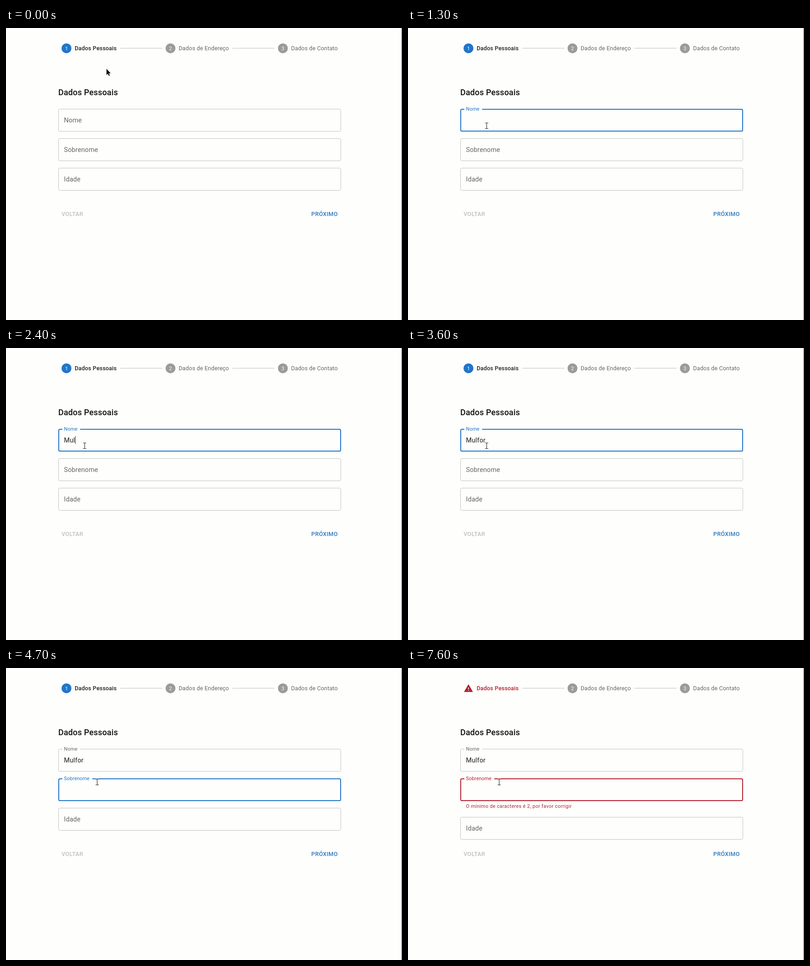
Recreate the animation shown at these times as an HTML page. Size 871 by 643 pixels, loop 8000 ms.

```html
<!DOCTYPE html>
<html lang="pt-BR">
<head>
<meta charset="utf-8">
<title>Cadastro em etapas</title>
<style>
  :root {
    --paper: #fefefd;
    --ink: #212121;
    --soft: #666;
    --line: #c1c1c1;
    --blue: #2074c4;
    --red: #b3202f;
  }
  html, body { margin: 0; width: 100%; height: 100%; overflow: hidden; background: var(--paper); }
  svg { display: block; width: 871px; height: 643px; font-family: Roboto, sans-serif; }
  text { white-space: pre; }
  .step { font-size: 12.6px; letter-spacing: .01071em; fill: var(--soft); }
  .num { font-size: 10.8px; fill: #fff; text-anchor: middle; }
  .dot { fill: #9b9b9b; }
  .rail { stroke: #bdbdbd; }
  .bold { font-weight: 500; }
  .head { font-size: 18px; letter-spacing: .0075em; fill: #111; }
  .btn { font-size: 12.6px; letter-spacing: .02857em; }
  .label, .value { font-size: 14.4px; letter-spacing: .00938em; }
  .value { fill: var(--ink); }
  .help { font-size: 10.8px; letter-spacing: .03333em; fill: var(--red); }
  .box { fill: none; }
</style>
</head>
<body>
<svg viewBox="0 0 871 643">
  <rect width="871" height="643" fill="#fefefd"/>
  <path d="M870.5 0V643" stroke="#55555a"/>

  <g id="badge">
    <circle cx="133" cy="44.7" r="10.8" fill="#2076cb"/>
    <text class="num" x="133" y="48.6">1</text>
  </g>
  <path id="alert" transform="translate(122.2 33.9) scale(.9)" fill="#b3202f"
        d="M1 21h22L12 2zm12-3h-2v-2h2zm0-4h-2v-4h2z"/>
  <text id="active" class="step bold" x="151" y="49">Dados Pessoais</text>
  <path class="rail" d="M251 44.5H344M498 44.5H591"/>
  <circle class="dot" cx="361.8" cy="44.7" r="10.8"/>
  <text class="num" x="361.8" y="48.6">2</text>
  <text class="step" x="379.7" y="49">Dados de Endereço</text>
  <circle class="dot" cx="609" cy="44.7" r="10.8"/>
  <text class="num" x="609" y="48.6">3</text>
  <text class="step" x="627" y="49">Dados de Contato</text>

  <text class="head bold" x="115" y="148">Dados Pessoais</text>
  <g id="form"></g>
  <text class="btn bold" x="122.2" y="414" fill="#bfbfbf">VOLTAR</text>
  <text class="btn bold" x="671.5" y="414" fill="#2a76bd">PRÓXIMO</text>

  <rect id="caret" width="1" height="17" fill="#222"/>
  <g id="arrow">
    <path d="M0 0V13.6L3.1 10.7 5.2 15.6 7.4 14.6 5.3 9.8H9.4Z" fill="#111" stroke="#fff" stroke-width="1.6"
          paint-order="stroke" stroke-linejoin="round"/>
  </g>
  <g id="beam" fill="none">
    <path d="M-3.5-6H-1L0-5.5 1-6H3.5M0-5.5V6M-3.5 6.5H-1L0 6 1 6.5H3.5" stroke="#fff" stroke-width="2.6"/>
    <path d="M-3.5-6H-1L0-5.5 1-6H3.5M0-5.5V6M-3.5 6.5H-1L0 6 1 6.5H3.5" stroke="#222" stroke-width="1.1"/>
  </g>
</svg>
<script>
const LOOP = 8000, TICK = 100;
const LEFT = 115, RIGHT = 737, HEIGHT = 50, TEXT_X = 127.6;
const NAME = 'Mulfor';
const $ = id => document.getElementById(id);

// Value of the last [time, value] pair already reached.
const at = (list, t) => list.reduce((v, [time, next]) => t >= time ? next : v, list[0][1]);
const ramp = (t, start, span = 200) => {
  const x = Math.min(1, Math.max(0, (t - start) / span));
  return 1 - (1 - x) ** 3;
};
const mix = (from, to, p) => `color-mix(in srgb, ${to} ${(p * 100).toFixed(1)}%, ${from})`;
const show = (node, on) => node.setAttribute('visibility', on ? 'visible' : 'hidden');

const typed = [[0, 0], [1800, 1], [1900, 2], [2400, 3], [2700, 4], [2900, 5], [3000, 6]];
const surname = [[0, ''], [5000, '4'], [6300, ''], [6800, '4'], [7500, '']];
const caretOn = [[0, 0], [900, 1], [1300, 0], [1800, 1], [3600, 0], [4100, 1], [4700, 0],
  [5000, 1], [5500, 0], [6200, 1], [6800, 0], [7500, 1], [7600, 0]];
const FOCUS = [780, 4020];
const rests = [[600, [173, 215]], [3800, [176, 222]], [4000, [200.5, 251]]];

function add(cls, content = '', tag = 'text') {
  const node = document.createElementNS('http://www.w3.org/2000/svg', tag);
  node.setAttribute('class', cls);
  node.textContent = content;
  $('form').append(node);
  return node;
}

const fields = ['Nome', 'Sobrenome', 'Idade'].map(name => ({
  box: add('box', '', 'path'),
  label: add('label', name),
  value: add('value'),
  help: add('help', 'O mínimo de caracteres é 2, por favor corrigir')
}));

function place(node, x, y) {
  node.setAttribute('x', x);
  node.setAttribute('y', y);
}

// Rounded outline with an opening for the raised label.
function outline(top, width, gap) {
  const i = width / 2, r = 3.6 - i;
  const l = LEFT + i, b = top + HEIGHT - i, y = top + i, e = RIGHT - i;
  const arc = (dx, dy) => `a${r} ${r} 0 0 1 ${dx} ${dy}`;
  return `M${124 + gap} ${y}H${e - r}${arc(r, r)}V${b - r}${arc(-r, r)}` +
    `H${l + r}${arc(-r, -r)}V${y + r}${arc(r, -r)}H124`;
}

function pointer(t) {
  if (t >= 600) return at(rests, t);
  const x = t / 600, p = x * x * (3 - 2 * x);
  return [221 - 48 * p, 90 + 125 * p];
}

function render(t) {
  const focus = t < FOCUS[0] ? -1 : t < FOCUS[1] ? 0 : 1;
  const wrong = t >= 1800 && t < 1900 ? 0 : t >= 5000 ? 1 : -1;
  const alarm = [ramp(t, 1750) * (1 - ramp(t, 1850, 150)), ramp(t, 4950, 150)];
  const values = [NAME.slice(0, at(typed, t)), at(surname, t), ''];
  const [mx, my] = pointer(t);

  fields.forEach((f, i) => {
    const below = wrong >= 0 && i > wrong ? 20.6 : 0;
    const top = Math.round(178.2 + 64.8 * i + below);
    const lift = i < 2 ? ramp(t, FOCUS[i]) : 0;
    const focused = i === focus, bad = i === wrong;
    const hover = my >= top && my < top + HEIGHT;

    const gap = lift * (f.label.getComputedTextLength() * .75 + 9.6);
    const width = focused ? 2 : 1;
    f.box.setAttribute('d', outline(top, width, gap));
    f.box.style.strokeWidth = width;
    f.box.style.stroke = bad ? 'var(--red)' : focused ? 'var(--blue)' : hover ? 'var(--ink)' : 'var(--line)';

    const fade = i === 0 ? lift * (1 - ramp(t, FOCUS[1])) : lift;
    const base = mix('var(--soft)', 'var(--blue)', fade);
    f.label.style.fill = mix(base, 'var(--red)', alarm[i] || 0);
    f.label.setAttribute('transform', `translate(${TEXT_X} ${top + 30 - 26 * lift}) scale(${1 - .25 * lift})`);

    f.value.textContent = values[i];
    place(f.value, TEXT_X, top + 30);
    place(f.help, TEXT_X, top + 65);
    show(f.help, bad);

    if (focused) {
      const w = values[i] ? f.value.getComputedTextLength() : 0;
      place($('caret'), Math.round(TEXT_X + w), top + 16);
    }
  });

  show($('caret'), at(caretOn, t));
  show($('badge'), wrong < 0);
  show($('alert'), wrong >= 0);
  $('active').style.fill = mix('var(--ink)', 'var(--red)', Math.max(...alarm));

  const typing = my >= 178;
  show($('arrow'), !typing);
  show($('beam'), typing);
  $(typing ? 'beam' : 'arrow').setAttribute('transform', `translate(${mx} ${my})`);
}

const start = performance.now();
function frame() {
  const t = (performance.now() - start) % LOOP;
  render(Math.floor(t / TICK) * TICK);
  requestAnimationFrame(frame);
}
frame();
</script>
</body>
</html>
```
